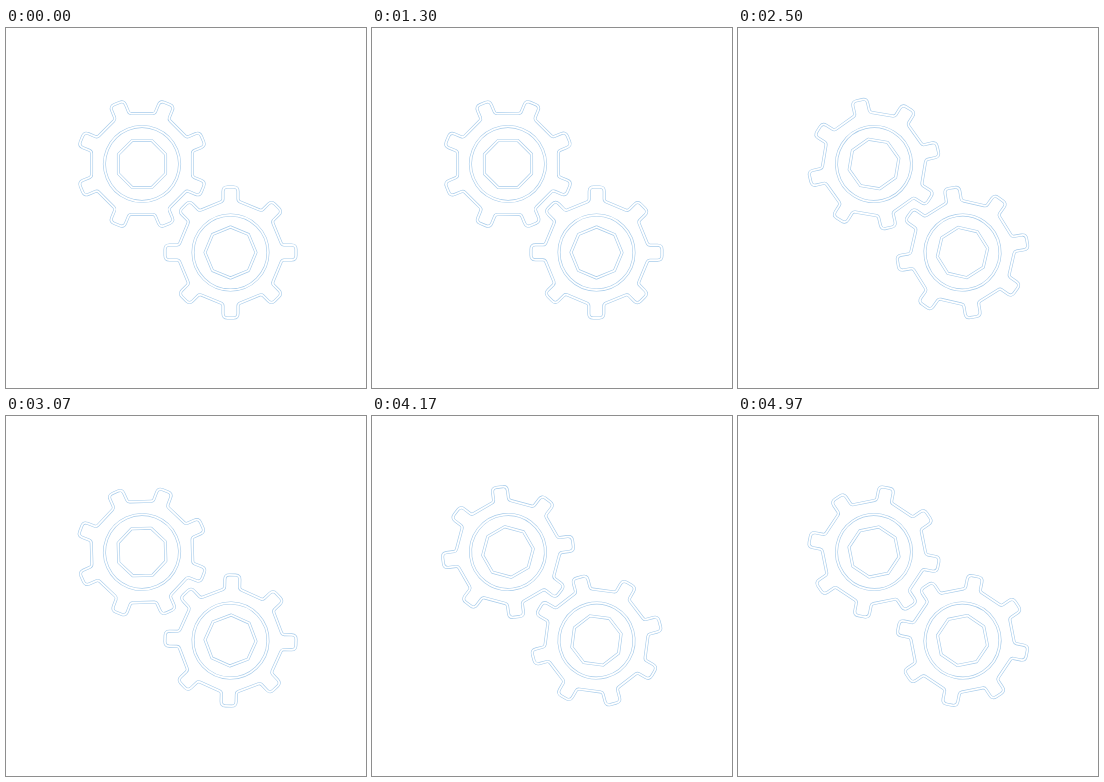
An HTML page that plays this animation: 360 px wide and 360 px high, repeating every 5.07 s.

```html
<!DOCTYPE html>
<html lang="en">
<head>
<meta charset="utf-8">
<title>Turning gears</title>
<style>
  html, body { margin: 0; width: 100%; height: 100%; overflow: hidden; background: #fff; }
  svg { display: block; width: 100vw; height: 100vh; }
  .edge, .core { fill: none; stroke-linejoin: round; }
  .edge { stroke: #a6cbea; stroke-width: 3; }
  .core { stroke: #fff; stroke-width: 1.8; }
</style>
</head>
<body>
<svg viewBox="0 0 360 360">
  <defs>
    <g id="gear">
      <path id="rim"/>
      <circle r="37.5"/>
      <path id="hub"/>
    </g>
  </defs>
  <g id="a"><use href="#gear" class="edge"/><use href="#gear" class="core"/></g>
  <g id="b"><use href="#gear" class="edge"/><use href="#gear" class="core"/></g>
</svg>
<script>
const LOOP = 5070, TICK = 1000 / 30, TICKS_PER_STEP = 2.4, STEPS = 63;
const TEETH = 8, PITCH = 360 / TEETH;
const $ = id => document.getElementById(id);

// Rotates a point about the gear's centre.
function turn(x, y, deg) {
  const r = deg * Math.PI / 180, c = Math.cos(r), s = Math.sin(r);
  return (x * c - y * s).toFixed(2) + ' ' + (x * s + y * c).toFixed(2);
}

function rimPath() {
  const half = 7.5, top = -65.5, round = 4.5, fillet = 2;
  const slope = Math.tan(Math.PI / TEETH);
  const valley = x => -54.6 + x * slope;
  let d = '';
  for (let i = 0; i < TEETH; i++) {
    const p = (x, y) => turn(x, y, i * PITCH);
    const foot = half + fillet;
    d += (i ? 'L' : 'M') + p(-foot, valley(foot)) +
      'Q' + p(-half, valley(half)) + ' ' + p(-half, valley(half) - fillet) +
      'L' + p(-half, top + round) +
      'Q' + p(-half, top) + ' ' + p(round - half, top) +
      'L' + p(half - round, top) +
      'Q' + p(half, top) + ' ' + p(half, top + round) +
      'L' + p(half, valley(half) - fillet) +
      'Q' + p(half, valley(half)) + ' ' + p(foot, valley(foot));
  }
  return d + 'Z';
}

function hubPath() {
  let d = '';
  for (let i = 0; i < TEETH; i++) d += (i ? 'L' : 'M') + turn(0, -25.5, i * PITCH);
  return d + 'Z';
}

$('rim').setAttribute('d', rimPath());
$('hub').setAttribute('d', hubPath());

// Step number and turned angle; two full turns per loop.
const keys = [[0, 0], [10, 101], [21, 247.5], [31, 369.5], [38, 448.25],
  [52, 600], [62, 708.6], [STEPS, 720]];

const last = keys.length - 1;
const slopes = keys.map((k, i) => {
  const p = i ? keys[i - 1] : [keys[last - 2][0] - STEPS, keys[last - 2][1] - 720];
  const n = i < last ? keys[i + 1] : [keys[1][0] + STEPS, keys[1][1] + 720];
  return (n[1] - p[1]) / (n[0] - p[0]);
});
slopes[last] = slopes[0];

function angleAt(n) {
  let i = 0;
  while (i < last - 1 && n >= keys[i + 1][0]) i++;
  const [n0, a0] = keys[i], [n1, a1] = keys[i + 1];
  const w = n1 - n0, u = (n - n0) / w, v = 1 - u;
  return v * v * (1 + 2 * u) * a0 + u * u * (3 - 2 * u) * a1 +
    w * u * v * (v * slopes[i] - u * slopes[i + 1]);
}

function pose(id, x, y, deg) {
  $(id).setAttribute('transform', `translate(${x} ${y}) rotate(${deg.toFixed(3)})`);
}

function draw(ms) {
  const tick = Math.floor((ms % LOOP + 4) / TICK);
  const step = Math.min(STEPS - 1, Math.floor(tick / TICKS_PER_STEP + 1e-6));
  const angle = angleAt(step);
  pose('a', 136, 136, PITCH / 2 + angle);
  pose('b', 224.5, 224.5, -angle);
}

const start = performance.now();
function loop() {
  draw(performance.now() - start);
  requestAnimationFrame(loop);
}
loop();
</script>
</body>
</html>
```
